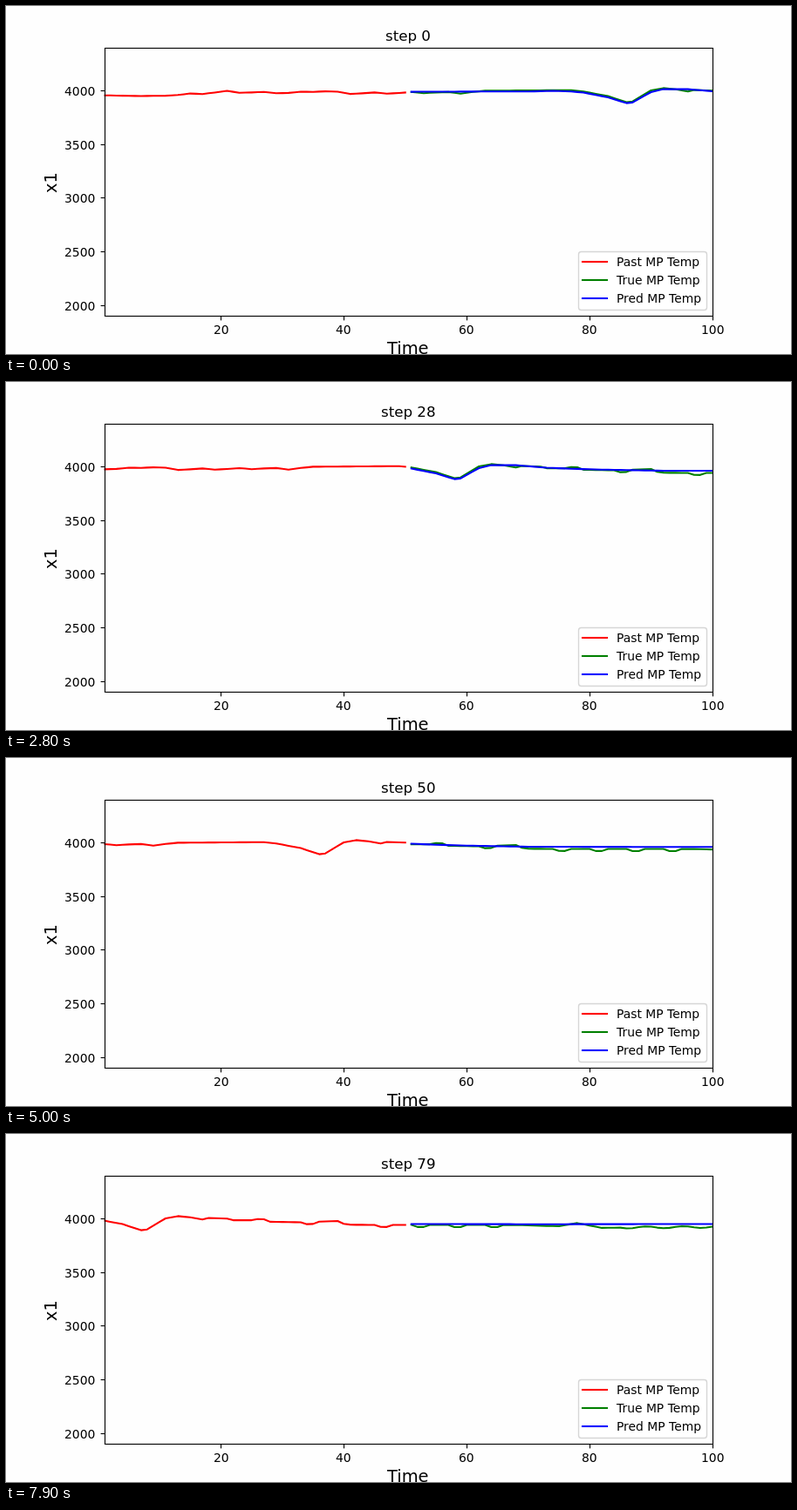
An HTML page with a canvas for the animation above (8 s loop, 900 by 400 pixels).

```html
<!DOCTYPE html>
<html lang="en">
<head>
<meta charset="utf-8">
<title>Temperature forecast</title>
<style>
html, body { margin: 0; width: 100%; height: 100%; overflow: hidden; background: #fefefe; }
canvas { display: block; }
</style>
</head>
<body>
<canvas id="c" width="900" height="400"></canvas>
<script>
const ctx = document.getElementById('c').getContext('2d');
const STEP_MS = 100, STEPS = 80;
const LEFT = 112.5, RIGHT = 810, TOP = 48, BOTTOM = 356;
const LINE = 2.08;
const FONT = '"DejaVu Sans", sans-serif';

// Key points of the measured trend and of the forecast: [sample, height in px].
const trend = [
  [1, 102.7], [7, 103.5], [11, 103.1], [17, 100.5], [21, 98.2], [23, 99.1],
  [32, 99.9], [36, 97.4], [41, 100.4], [48, 100], [55, 99.3], [59, 100], [63, 97.4],
  [77, 96.7], [79, 98.2], [83, 103.6], [86, 110.6], [87, 109.7], [90, 97],
  [92, 94.4], [94, 95.8], [96, 98.3], [97, 96.5], [100, 97.2], [101, 99.1],
  [104, 99.1], [105, 97.8], [106, 98], [107, 100.9], [112, 101.5], [118, 100],
  [120, 101.7], [121, 104.4], [147, 104.6], [154, 106], [157, 102.4],
  [161, 107.9], [165, 107.5], [179, 106.8]
];
const outlook = [
  [51, 98.6], [63, 98.3], [70, 98.3], [74, 97.5], [77, 98.2], [79, 99.5], [83, 105],
  [86, 111.6], [87, 110.9], [90, 99], [92, 95.6], [96, 95.6], [101, 98.5],
  [105, 99.7], [110, 100.7], [120, 102], [150, 102.3], [179, 102.1]
];

const clamp = v => Math.max(0, Math.min(1, v));
const wave = (g, crest) => Math.cos((g - crest) * Math.PI / 3);

function along(points, g) {
  const i = Math.max(1, points.findIndex(p => p[0] >= g));
  const [a, ya] = points[i - 1], [b, yb] = points[i];
  return ya + (yb - ya) * (g - a) / (b - a);
}

// A ripple that repeats every six samples and changes its character along the way.
function ripple(g) {
  if (g >= 15 && g <= 62) return 0.85 * wave(g, 41.6);
  if (g >= 112 && g <= 146) return wave(g, 125.5) > 0.6 ? 2.4 : 0;
  if (g >= 165) return 1.1 * wave(g, 165.2);
  return 0;
}

function measured(g) {
  // The first part is sampled half as often.
  if (g < 85 && g % 2 === 0) return (measured(g - 1) + measured(g + 1)) / 2;
  return along(trend, g) + ripple(g);
}

function predicted(g, step) {
  return along(outlook, g) + 1.4 * clamp((step - 50) / 20);
}

const toX = x => LEFT + (x - 1) * (RIGHT - LEFT) / 99;
const toY = v => BOTTOM - (v - 1900) * (BOTTOM - TOP) / 2500;

function curve(color, from, to, height) {
  ctx.beginPath();
  for (let x = from; x <= to; x++) ctx.lineTo(toX(x), height(x));
  ctx.strokeStyle = color;
  ctx.stroke();
}

function segment(x1, y1, x2, y2) {
  ctx.beginPath();
  ctx.moveTo(x1, y1);
  ctx.lineTo(x2, y2);
  ctx.stroke();
}

// Text starts on a whole pixel; anchor is 0 for left, 0.5 for centre, 1 for right.
function label(text, x, y, size, anchor) {
  ctx.font = size + 'px ' + FONT;
  ctx.fillStyle = '#000';
  ctx.fillText(text, Math.round(x - anchor * ctx.measureText(text).width), y);
}

function drawAxes() {
  ctx.strokeStyle = '#000';
  ctx.lineWidth = 1.11;
  ctx.lineCap = 'butt';
  ctx.strokeRect(113.5, 48.5, 697, 308);
  for (let v = 20; v <= 100; v += 20) {
    const x = Math.floor(toX(v)) + 0.5;
    segment(x, BOTTOM + 0.5, x, BOTTOM + 5.4);
    label(v, toX(v), 377, 13.89, 0.5);
  }
  for (let v = 2000; v <= 4000; v += 500) {
    const y = Math.round(toY(v));
    segment(108.6, y + 0.5, 113.5, y + 0.5);
    label(v, 102.8, y + 6, 13.89, 1);
  }
  label('Time', 461.2, 400, 19.44, 0.5);
  ctx.save();
  ctx.translate(58, 203);
  ctx.rotate(-Math.PI / 2);
  label('x1', 0, 0, 19.44, 0.5);
  ctx.restore();
}

function drawLegend() {
  ctx.beginPath();
  ctx.roundRect(656.5, 282.5, 147, 67, 3);
  ctx.fillStyle = 'rgba(255,255,255,0.8)';
  ctx.fill();
  ctx.strokeStyle = 'rgba(204,204,204,0.8)';
  ctx.lineWidth = 1.39;
  ctx.stroke();
  ctx.lineWidth = LINE;
  ctx.lineCap = 'square';
  [['red', 'Past'], ['green', 'True'], ['blue', 'Pred']].forEach(([color, name], i) => {
    const y = 294 + i * 21;
    ctx.strokeStyle = color;
    segment(661, y, 689, y);
    label(name + ' MP Temp', 700, y + 5, 13.89, 0);
  });
}

function draw(step) {
  ctx.fillStyle = '#fefefe';
  ctx.fillRect(0, 0, 900, 400);

  ctx.save();
  ctx.beginPath();
  ctx.rect(LEFT, TOP, RIGHT - LEFT, BOTTOM - TOP);
  ctx.clip();
  ctx.lineWidth = LINE;
  ctx.lineCap = 'square';
  ctx.lineJoin = 'round';
  const real = x => measured(step + x);
  curve('red', 1, 50, real);
  curve('green', 51, 100, real);
  curve('blue', 51, 100, x => predicted(step + x, step));
  ctx.restore();

  drawAxes();
  drawLegend();
  label('step ' + step, 461.2, 40, 16.67, 0.5);
}

const start = performance.now();
function tick() {
  const t = Math.max(0, performance.now() - start);
  draw(Math.floor(t / STEP_MS) % STEPS);
  requestAnimationFrame(tick);
}
tick();
</script>
</body>
</html>
```
